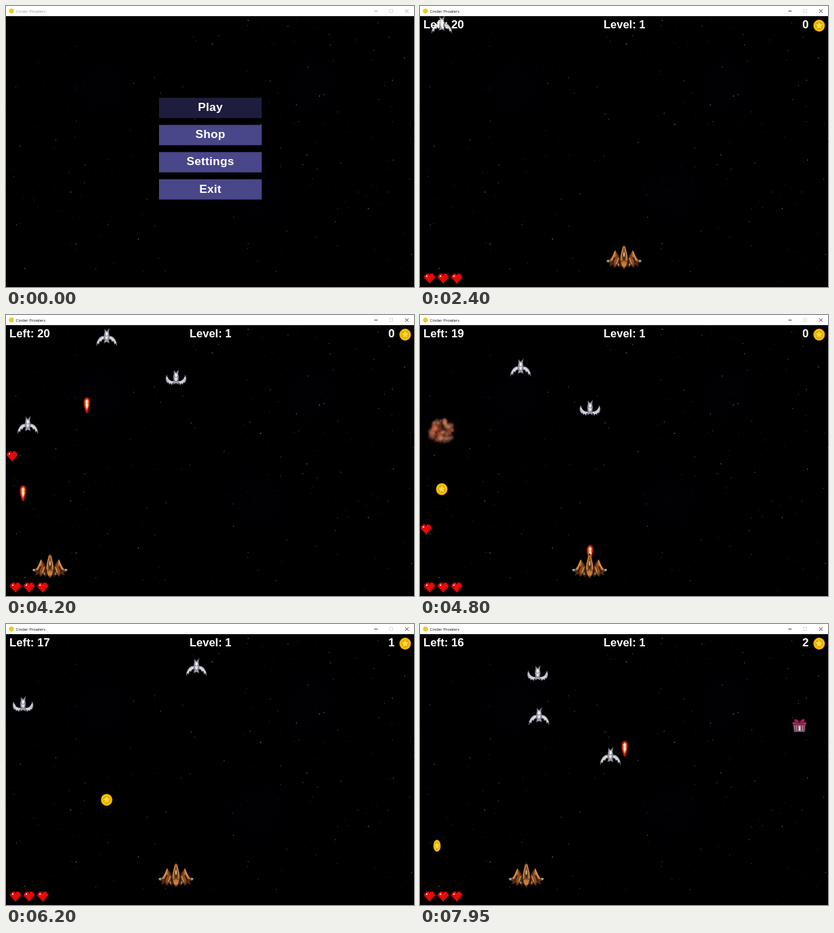
These frames come from a looping animation (600 px wide and 415 px high, 8000 ms). An HTML page with a canvas:

```html
<!DOCTYPE html>
<html lang="en">
<head>
<meta charset="utf-8">
<title>Cinder Prowlers</title>
<style>
html, body { margin: 0; width: 100%; height: 100%; overflow: hidden; background: #000; }
canvas { display: block; }
</style>
</head>
<body>
<canvas id="stage" width="600" height="415"></canvas>
<script>
const LOOP = 8000, GAME_START = 2000;
const TOP = 20, GUN_Y = 350, CATCH_Y = 352;
// Speeds in pixels per ms
const SHIP = 0.55, SHOT = 0.5, DIVE = 0.075, FALL = 0.18;
const stage = document.getElementById('stage');
let c = stage.getContext('2d');

// The ship heads for x from each time on: time, x
const moves = [[2780, 25], [3480, 148], [3711, 25], [4129, 283], [4740, 120], [5036, 241],
  [5257, 27], [5750, 250], [6330, 148], [6740, 25], [7011, 301], [7688, 25]];
const shots = [3764, 4024, 4800, 5076, 5296, 6520, 6970, 7616]
  .map(fired => ({ fired, x: shipX(fired), end: Infinity }));
const dragons = [[32, 2303], [250, 3220], [148, 4033], [25, 4870], [280, 5620], [175, 6405], [173, 7230]]
  .map(([x, born]) => ({ x, born, hit: Infinity, taken: Infinity }));

function shipX(t) {
  let x = 300;
  moves.forEach(([start, goal], i) => {
    const stop = i + 1 < moves.length ? moves[i + 1][0] : LOOP;
    const reach = SHIP * Math.max(0, Math.min(t, stop) - start);
    x += Math.max(-reach, Math.min(reach, goal - x));
  });
  return x;
}

const diveY = (d, t) => TOP + DIVE * (t - d.born);

// Each shot takes the first dragon above it; a coin is caught if the ship is below
for (const s of shots) {
  for (const d of dragons) {
    const t = s.fired + (GUN_Y - 27 - diveY(d, s.fired)) / (SHOT + DIVE);
    if (d.hit < Infinity || t < Math.max(s.fired, d.born) || Math.abs(s.x - d.x) > 18) continue;
    d.hit = s.end = t;
    const landed = t + (CATCH_Y - diveY(d, t)) / FALL;
    if (Math.abs(shipX(landed) - d.x) < 25) d.taken = landed;
    break;
  }
}

function random(seed) {
  return () => (seed = seed * 16807 % 2147483647) / 2147483647;
}

function shape(d, fill, stroke, width = 0.7) {
  const p = new Path2D(d);
  if (fill) { c.fillStyle = fill; c.fill(p); }
  if (stroke) { c.strokeStyle = stroke; c.lineWidth = width; c.stroke(p); }
}

function oval(x, y, rx, ry, fill) {
  c.fillStyle = fill;
  c.beginPath();
  c.ellipse(x, y, rx, ry, 0, 0, 7);
  c.fill();
}

function box(x, y, w, h, fill) {
  c.fillStyle = fill;
  c.fillRect(x, y, w, h);
}

function at(x, y, draw, ...args) {
  c.save();
  c.translate(x, y);
  draw(...args);
  c.restore();
}

function mirrored(draw) {
  draw();
  c.save();
  c.scale(-1, 1);
  draw();
  c.restore();
}

function glow(x, y, r, inner, outer) {
  const g = c.createRadialGradient(x, y, 0, x, y, r);
  g.addColorStop(0, inner);
  g.addColorStop(1, outer);
  oval(x, y, r, r, g);
}

function label(text, x, y, size, align = 'left', spacing = 0) {
  c.font = `bold ${size}px "Liberation Sans", Arial, sans-serif`;
  c.letterSpacing = spacing + 'px';
  c.textAlign = align;
  c.fillStyle = '#fff';
  c.fillText(text, x, y);
  c.letterSpacing = '0px';
}

function makeSky() {
  const sky = document.createElement('canvas'), screen = c;
  sky.width = 600;
  sky.height = 415;
  c = sky.getContext('2d');
  box(0, 0, 600, 415, '#000001');
  for (const [x, y] of [[140, 120], [450, 115], [370, 275]])
    glow(x, y, 60, 'rgba(10,10,34,.14)', 'rgba(5,5,20,0)');
  const rnd = random(71);
  for (let i = 0; i < 450; i++) {
    const x = rnd() * 600, y = 15 + rnd() * 396, light = rnd() ** 4;
    const s = 0.8 + light * 0.5;
    box(x, y, s, s, `rgba(190,195,200,${0.15 + light * 0.55})`);
  }
  box(0, 411, 600, 4, '#000');
  c = screen;
  return sky;
}

function dragon(up) {
  mirrored(() => {
    if (up) {
      shape('M2 4 Q8 5 11 1 Q13 -1 13.5 -5 Q17 1 12.5 7 L11.5 5.5 L10 9 L8 7 L6 10 L5 7 L2 8Z', '#b9b9c4', '#5c5c6a', 0.6);
      shape('M3 5.5 Q10 6 13.5 -2 M6 8 L12 4', null, '#f4f4fa', 1);
    } else {
      shape('M2 -1 Q8 -3 12 3 Q15 7 15 13 L13 9 L11.5 11 L10 6 L8 7 L6 3 L2 4Z', '#b9b9c2', '#5c5c66', 0.6);
      shape('M2 0.5 Q9 -1 13.5 9 M5 2 L10 5', null, '#f4f4fa', 1);
    }
  });
  shape('M-3 -12 L-1 -9 L1 -9 L4 -13 L3 -7 L4 -2 L3 5 L4 9 L0 7 L-4 9 L-3 5 L-4 -2 L-3 -7Z', '#a9a9b6', '#4a4a58');
  shape('M-1 -7 L1.5 -7 L1.5 0 L0 5 L-1.5 0Z', '#f2f2f7');
  shape('M-3 -3 L0 -1 L3 -3 M-3 3 L0 5 L3 3', null, '#60606c', 0.8);
  oval(1, -8, 0.8, 0.9, '#b06060');
}

function ship() {
  mirrored(() => {
    shape('M4 4 L9 -5 L13 -11 L16 -3 L19 2 L25 5 L25 8 L20 9 L22 14 L16 11 L14 16 L10 12 L7 16 L4 12Z', '#5a2f16', '#241208');
    shape('M13 -10 Q18 0 21 6 L16 5 L11 -3Z', '#b8692c');
    shape('M10 -4 L15 7 L13 14 L9 5Z', '#8b5026');
    shape('M13 -9 L16 0 L20 5 M8 1 L11 10', null, '#e6aa5e', 1.1);
    shape('M14 0 L17 9 M6 5 L7 14', null, '#201008', 1.2);
    oval(23.5, 5.5, 2, 1.4, '#a3abad');
    oval(8, 11, 1.2, 2, '#8d8274');
  });
  shape('M0 -19 L3 -11 L6 1 L5 11 L0 18 L-5 11 L-6 1 L-3 -11Z', '#8e4d1e', '#2d1609', 1);
  mirrored(() => shape('M1 -16 L4 -3 L4 5 M3 7 L1.5 14', null, '#dd984a', 1.2));
  oval(0, -1, 1.8, 6, '#35302d');
  oval(0, -4, 1, 3.5, '#d8c9b2');
  oval(0, 10, 1.3, 4, '#cf853c');
}

function fireball() {
  shape('M0 -12 C5 -12 6 -6 4 1 L2 10 L0 12 L-2 9 Q-5 1 -5 -5 Q-4 -12 0 -12Z', '#b01a0a', '#5a0a04', 1);
  shape('M0 -10 C4 -9 4 -3 2 4 L0 8 L-2 4 Q-4 -2 -3 -7Z', '#f4602a');
  shape('M0 -9 L2 -6 L1 -3 L2 0 L0 5 L-1.5 0 L-1 -4 L-2 -6Z', '#fff2cc');
}

function heart() {
  const rows = ['0110110', '1111111', '1111111', '0111110', '0011100', '0001000'];
  const cells = (grow, fill) => rows.forEach((row, j) => [...row].forEach((on, i) => {
    if (+on) box(-7.35 + i * 2.1 - grow, -6.3 + j * 2.2 - grow, 2.2 + grow * 2, 2.3 + grow * 2, fill);
  }));
  cells(0.7, '#5c0505');
  cells(0, '#f20d0d');
  box(-5, -4, 2, 2, '#ffd0d0');
}

function coin(rx) {
  oval(0, 0, rx, 9, '#b98205');
  oval(0, 0, rx * 0.9, 8.3, '#f9c80f');
  oval(0, 0, rx * 0.7, 6.4, '#e8ab0a');
  c.scale(rx / 9, 1);
  c.beginPath();
  for (let i = 0; i < 10; i++) {
    const r = i % 2 ? 2.6 : 5.4, a = i * Math.PI / 5;
    c.lineTo(r * Math.sin(a), -r * Math.cos(a));
  }
  c.fillStyle = '#ffe23c';
  c.fill();
}

function gift() {
  shape('M-9 -3 L9 -3 L8 9 L-8 9Z', '#8f8791', '#3f1c2e');
  for (const x of [-7, -3.5, 2, 5.5]) box(x, -2, 1.8, 10, '#a8265c');
  box(-1, 1, 2.4, 6, '#e8e0e6');
  box(-10, -5, 20, 4, '#b02a62');
  box(-10, -2, 20, 1, '#5b1737');
  mirrored(() => shape('M0 -4 Q2 -10 7 -10 Q9 -6 4 -4Z', '#a81f55', '#4f0f28'));
}

function explosion(age) {
  const rnd = random(23);
  c.globalAlpha = Math.min(1, (600 - age) / 300);
  const size = 0.75 + 0.25 * Math.min(1, age / 200);
  c.scale(size, size);
  glow(0, 0, 20, 'rgba(190,80,50,.9)', 'rgba(120,40,25,.2)');
  for (let i = 0; i < 90; i++) {
    const a = rnd() * 6.28, d = Math.sqrt(rnd()) * 17.5, r = 2 + rnd() * 4.5;
    const tone = ['214,92,56', '250,150,104', '120,44,30', '255,190,140'][i % 4];
    glow(d * Math.cos(a), d * Math.sin(a), r, `rgba(${tone},.9)`, `rgba(${tone},0)`);
  }
}

function menu(t) {
  // The pointer runs down to the last button, back to the second, then to the first
  const step = Math.max(0, Math.min(5, Math.floor((t - 850) / 100)));
  const active = t < 1750 ? Math.min(step, 6 - step) : 0;
  ['Play', 'Shop', 'Settings', 'Exit'].forEach((name, i) => {
    const y = 135.5 + i * 40.1;
    box(225, y, 151, 30, i === active ? '#1e1d3d' : '#494689');
    label(name, 300.5, y + 19.7, 17.3, 'center', 0.25);
  });
}

function game(t) {
  const drop = (x, y0, born, draw) => {
    if (t >= born) at(x, y0 + FALL * (t - born), draw);
  };
  const coinWidth = 9 * Math.abs(Math.cos(Math.PI * (t - 5400) / 510 + 0.95)) + 0.3;

  dragons.forEach((d, i) => {
    if (t < d.born) return;
    const y = diveY(d, Math.min(t, d.hit));
    if (t < d.hit) {
      at(d.x, y, dragon, Math.cos((t + 206 * i - 175) / 600 * 2 * Math.PI) > -0.15);
      return;
    }
    if (t - d.hit < 600) at(d.x, y, explosion, t - d.hit);
    if (t < d.taken) drop(d.x, y, d.hit, () => coin(coinWidth));
  });
  drop(9, TOP, 3156, heart);
  drop(558, TOP, 7228, gift);

  for (const s of shots)
    if (t >= s.fired && t < s.end) at(s.x, GUN_Y + 2 - SHOT * (t - s.fired), fireball);
  at(shipX(t), 371, ship);

  const count = key => dragons.filter(d => d[key] <= t).length;
  label('Left: ' + (20 - count('hit')), 5, 33.3, 16.8);
  label('Level: 1', 270, 33.3, 16.5);
  label(count('taken'), 571.5, 33.3, 16.8, 'right');
  at(587, 29, coin, 8.7);
  for (const x of [14, 34, 54]) at(x, 402, heart);
}

function titleBar(focused) {
  const ink = focused ? '#111' : '#999';
  box(0, 0, 600, 15, '#fff');
  oval(8, 7.3, 3.6, 3.6, '#f0c62e');
  c.font = '5.9px "Open Sans", "Noto Sans", sans-serif';
  c.textAlign = 'left';
  c.fillStyle = ink;
  c.fillText('Cinder Prowlers', 14.5, 9.5);
  shape('M541.5 7.5 H546.5 M587 5 L592 10 M592 5 L587 10', null, ink, 0.8);
  shape('M564 5 h4.5 v4.5 h-4.5Z', null, '#ccc', 0.7);
}

const sky = makeSky();

function frame(now) {
  const t = now % LOOP;
  c.drawImage(sky, 0, 0);
  if (t < GAME_START) menu(t);
  else game(t);
  titleBar(t >= 50);
  requestAnimationFrame(frame);
}
requestAnimationFrame(frame);
</script>
</body>
</html>
```
